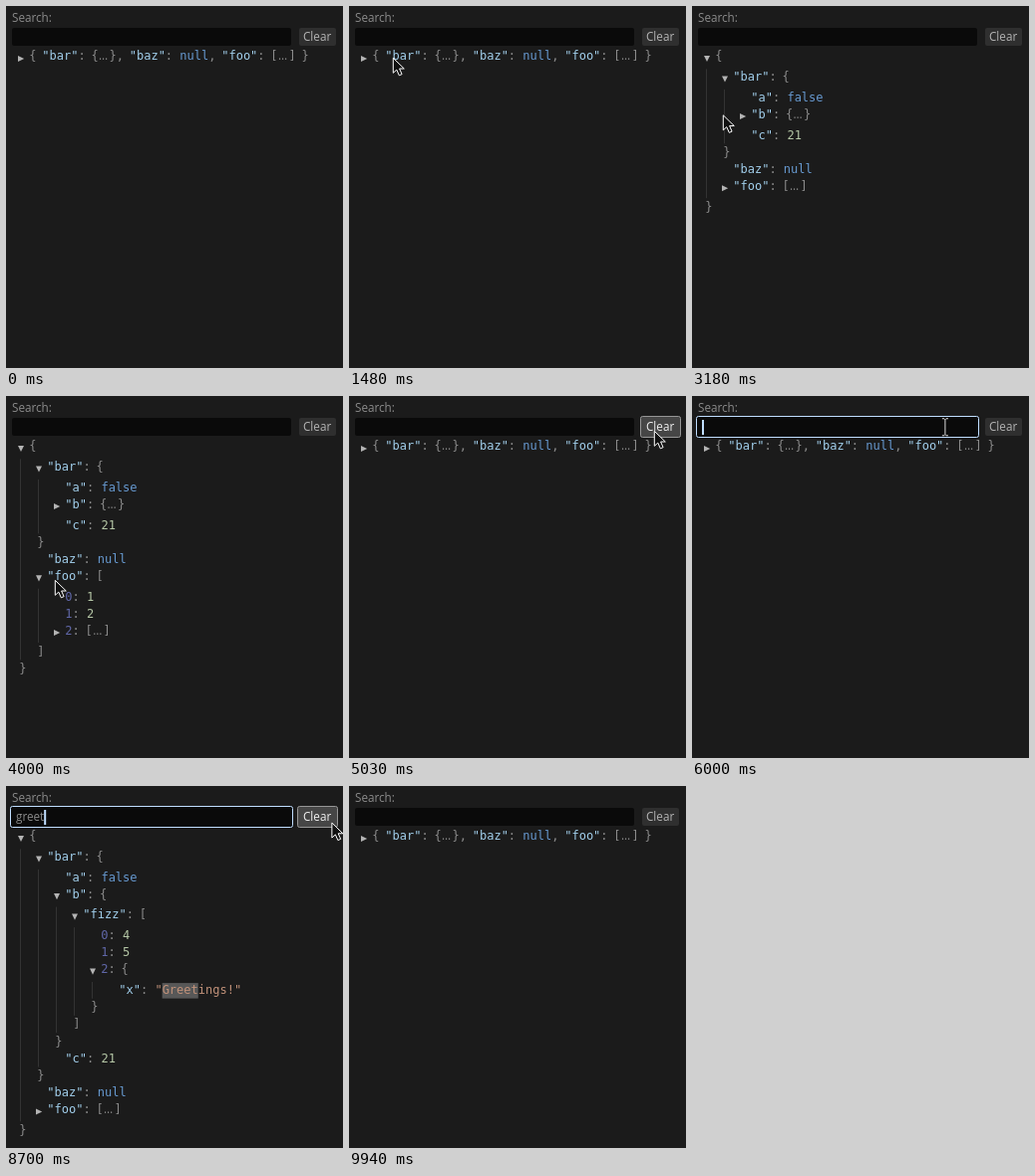
Write an HTML page that moves like this. It is 338 by 364 pixels and loops after 10 s.

```html
<!DOCTYPE html>
<html lang="en">
<head>
<meta charset="utf-8">
<title>JSON tree search</title>
<style>
html, body { margin: 0; width: 100%; height: 100%; overflow: hidden; background: #1b1b1b; }
svg { display: block; }
text { white-space: pre; }
.ui { font: 400 11.7px "Open Sans", "Noto Sans", sans-serif; fill: #8c8c8c; }
.mono { font: 12px "DejaVu Sans Mono", monospace; }
.key { fill: #a1ceeb; }
.idx { fill: #6067a8; }
.lit { fill: #679ad1; }
.num { fill: #b5c7a6; }
.str { fill: #c2927a; }
.dim { fill: #8c8c8c; }
.guide { stroke: #333; }
.mark { fill: #585858; }
.tri { fill: #b4b4b4; }
.tri.hot { fill: #fff; }
#field { fill: #0a0a0a; }
#button { fill: #2f2f2f; }
#caret { fill: #c0deff; }
</style>
</head>
<body>
<svg id="stage" width="338" height="364" viewBox="0 0 338 364">
  <text class="ui" x="6" y="16">Search:</text>
  <rect id="field" rx="2"/>
  <text class="ui" id="query" x="10" y="35"></text>
  <rect id="caret" y="24" width="2" height="15"/>
  <rect id="button" rx="2"/>
  <text class="ui" id="clear" x="298" y="35">Clear</text>
  <g id="tree" class="mono"></g>
  <path id="arrow" d="M-.7 -.7V14.3L2.8 11.1L5.3 16.8L8.1 15.6L5.6 10H10.3Z" fill="#111" stroke="#fff" stroke-linejoin="round"/>
  <path id="beam" d="M-3 -8.5H-1L0 -7.5L1 -8.5H3M0 -7.5V7.5M-3 8.5H-1L0 7.5L1 8.5H3" fill="none" stroke="#ddd"/>
</svg>
<script>
const LOOP = 10000, OPEN_MS = 90;
const CH = 7.224, DOTS = 10.8, GAP = 5.8;
const LEFT = 23.3, TOP = 54.4, HEAD = 20.5, ROW = 17.2, INDENT = 18;
const LEAF_DROP = .6;
const $ = id => document.getElementById(id);

const leaf = (key, cls, value) => ({ key, cls, value });
const box = (key, ends, toggles, kids) => ({ key, ends, toggles, kids });

// Toggle times alternate between opening and closing.
const root = box("", "{}", [1940, 4850, 6670, 8910], [
  box('"bar"', "{}", [2700, 4850, 6670, 8910], [
    leaf('"a"', "lit", "false"),
    box('"b"', "{}", [6670, 8910], [
      box('"fizz"', "[]", [6670, 8910], [
        leaf("0", "num", "4"),
        leaf("1", "num", "5"),
        box("2", "{}", [6670, 8910], [leaf('"x"', "str", '"Greetings!"')])
      ])
    ]),
    leaf('"c"', "num", "21")
  ]),
  leaf('"baz"', "lit", "null"),
  box('"foo"', "[]", [3790, 4850], [
    leaf("0", "num", "1"),
    leaf("1", "num", "2"),
    box("2", "[]", [], [leaf("0", "num", "3")])
  ])
]);

const typed = [[6670, "g"], [7390, "gr"], [7520, "gre"], [8120, "gree"], [8180, "greet"], [8910, ""]];

// Pointer stops: time, x, y
const path = [
  [1060, 338, 84], [1480, 45, 53], [1720, 15, 52], [2090, 15, 52],
  [2450, 29, 76], [2550, 31, 74], [2930, 31, 74], [3580, 34, 184],
  [3900, 34, 184], [4000, 50, 186], [4700, 307, 36], [5060, 307, 36],
  [5330, 200, 27], [5760, 200, 27], [6330, 340, 38],
  [8610, 338, 40], [8830, 310, 34], [9000, 310, 34], [9270, 340, 38]
];

const clamp = v => Math.max(0, Math.min(1, v));
const ease = v => v * v * (3 - 2 * v);

function pointer(t) {
  const i = path.findIndex(p => p[0] > t) - 1;
  if (i < 0 || (t >= 6330 && t < 8610)) return { x: -99, y: -99 };
  const [t0, x0, y0] = path[i], [t1, x1, y1] = path[i + 1];
  const k = ease((t - t0) / (t1 - t0));
  return { x: x0 + (x1 - x0) * k, y: y0 + (y1 - y0) * k };
}

function openness(node, t) {
  let v = 0;
  node.toggles.forEach((at, i) => {
    const k = clamp((t - at) / OPEN_MS);
    if (t >= at) v = i % 2 ? 1 - k : k;
  });
  return v;
}

// Baselines snap to whole pixels.
const label = (x, y, cls, s) =>
  `<text x="${x.toFixed(2)}" y="${Math.round(y)}" class="${cls}">${s}</text>`;

function folded(node, x, y) {
  return label(x, y, "dim", node.ends[0]) +
    label(x + CH + .4, y, "ui", "…") +
    label(x + CH + DOTS, y, "dim", node.ends[1]);
}

function keyPart(node, x, y) {
  const w = node.key.length * CH;
  return label(x, y, node.key[0] === '"' ? "key" : "idx", node.key) + label(x + w, y, "dim", ":");
}

const valueX = (node, x) =>
  node.key ? x + (node.key.length + 1) * CH + (node.kids ? GAP : CH) : x;

function summary(node, x, y) {
  let out = label(x, y, "dim", node.ends[0]);
  x += CH + GAP;
  node.kids.forEach((kid, i) => {
    out += keyPart(kid, x, y);
    x = valueX(kid, x);
    out += kid.kids ? folded(kid, x, y) : label(x, y, kid.cls, kid.value);
    x += kid.kids ? 2 * CH + DOTS : kid.value.length * CH;
    if (i < node.kids.length - 1) {
      out += label(x, y, "dim", ",");
      x += CH;
    }
    x += GAP;
  });
  return out + label(x, y, "dim", node.ends[1]);
}

function marks(value, query, x, y) {
  let out = "";
  if (!query) return out;
  const low = value.toLowerCase();
  for (let i = low.indexOf(query); i >= 0; i = low.indexOf(query, i + query.length))
    out += `<rect class="mark" x="${x + i * CH}" y="${y - 11}" width="${query.length * CH}" height="15.5"/>`;
  return out;
}

function triangle(x, y, open, mouse) {
  const hot = Math.abs(mouse.x - x) < 9 && Math.abs(mouse.y - y) < 9;
  return `<path class="tri${hot ? " hot" : ""}" d="M-3 -3L3.2 0L-3 3Z"
    transform="translate(${x} ${y}) rotate(${open * 90}) scale(${hot ? 1.25 : 1})"/>`;
}

// Returns the markup of a node and the baseline of the row after it.
function draw(node, depth, y, scene) {
  const x = LEFT + depth * INDENT, vx = valueX(node, x);
  if (!node.kids) {
    const base = y + LEAF_DROP;
    const back = node.cls === "str" ? marks(node.value, scene.query, vx, base) : "";
    return [keyPart(node, x, base) + back + label(vx, base, node.cls, node.value), y + ROW];
  }
  const open = openness(node, scene.t), tx = 15 + depth * INDENT;
  let out = node.key ? keyPart(node, x, y) : "";
  out += triangle(tx, y - 1.5, open, scene.mouse);
  if (!open) return [out + (node.key ? folded(node, vx, y) : summary(node, x, y)), y + HEAD];

  out += label(vx, y, "dim", node.ends[0]);
  let body = "", next = y + HEAD;
  for (const kid of node.kids) {
    const [part, end] = draw(kid, depth + 1, next, scene);
    body += part;
    next = end;
  }
  body += `<path class="guide" d="M${tx - .5} ${y + 9}V${next - 12}"/>`;
  body += label(x - 10, next + LEAF_DROP, "dim", node.ends[1]);
  next += ROW;
  if (open === 1) return [out + body, next];

  const top = y + 6, height = (next - y - HEAD) * open;
  out += `<svg x="0" y="${top}" width="338" height="${height}" viewBox="0 ${top} 338 ${height}">${body}</svg>`;
  return [out, y + HEAD + height];
}

function frame(el, x, y, w, h, stroke) {
  const grow = stroke ? 1.5 : 0;
  const attrs = { x: x - grow, y: y - grow, width: w + 2 * grow, height: h + 2 * grow, stroke: stroke || "none" };
  for (const name in attrs) el.setAttribute(name, attrs[name]);
}

function place(el, mouse, show) {
  el.setAttribute("visibility", show ? "visible" : "hidden");
  el.setAttribute("transform", `translate(${mouse.x.toFixed(2)} ${mouse.y.toFixed(2)})`);
}

function render(t) {
  const mouse = pointer(t);
  const over = (x0, x1) => mouse.x >= x0 && mouse.x <= x1 && mouse.y > 20 && mouse.y < 41;
  const inField = over(5, 287), inButton = over(293, 332);
  const focused = t >= 5700 && t < 8910;
  const query = typed.reduce((s, [at, text]) => t >= at ? text : s, "");

  frame($("field"), 6, 22, 280, 18, focused ? "#c0deff" : inField ? "#969696" : "");
  frame($("button"), 294, 22, 37, 18, inButton ? "#969696" : "");
  $("button").style.fill = inButton ? "#464646" : "";
  $("clear").style.fill = inButton ? "#f0f0f0" : "#b4b4b4";

  const text = $("query");
  text.textContent = query;
  $("caret").setAttribute("x", 10 + (query ? text.getComputedTextLength() : 0));
  $("caret").setAttribute("visibility", focused ? "visible" : "hidden");

  $("tree").innerHTML = draw(root, 0, TOP, { t, mouse, query })[0];
  place($("beam"), mouse, inField);
  place($("arrow"), mouse, !inField);
}

const start = performance.now();
function tick() {
  render((performance.now() - start) % LOOP);
  requestAnimationFrame(tick);
}
tick();
</script>
</body>
</html>
```
